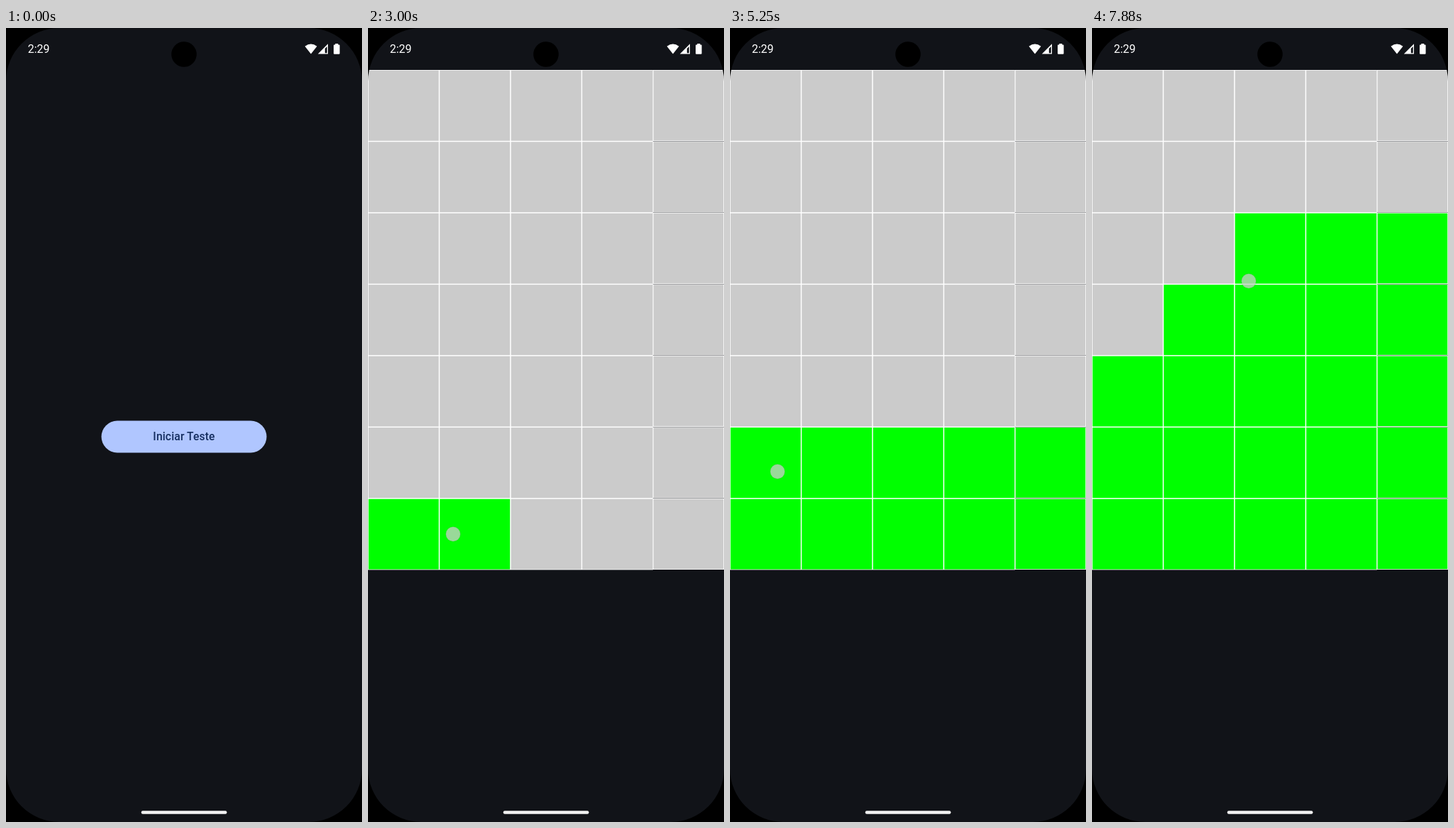
Recreate the animation shown at these times as an HTML page. Size 502 by 1117 pixels, loop 8 s.

```html
<!DOCTYPE html>
<html lang="pt">
<head>
<meta charset="utf-8">
<title>Teste de toque</title>
<style>
  html, body { margin: 0; width: 100%; height: 100%; overflow: hidden; background: #000; }
  svg { display: block; width: 502px; height: 1117px; }
  text { font-family: Roboto, sans-serif; }
</style>
</head>
<body>
<svg viewBox="0 0 502 1117">
  <defs>
    <radialGradient id="soft">
      <stop offset=".8" stop-color="#152e60"/>
      <stop offset="1" stop-color="#152e60" stop-opacity="0"/>
    </radialGradient>
    <clipPath id="pill"><rect x="134.5" y="552.6" width="233" height="44.8" rx="22.4"/></clipPath>
  </defs>
  <rect width="502" height="1117" fill="#111318"/>

  <g id="start">
    <rect x="134.5" y="552.6" width="233" height="44.8" rx="22.4" fill="#b0c6ff"/>
    <circle id="ripple" cx="250.5" cy="575" fill="url(#soft)" clip-path="url(#pill)"/>
    <text x="251" y="580.4" font-size="15.7" font-weight="500" letter-spacing=".11" text-anchor="middle" fill="#152e60">Iniciar Teste</text>
  </g>

  <g id="grid"></g>

  <path fill="#000" fill-rule="evenodd" d="M0 0H502V1117H0ZM75 0A75 75 0 0 0 0 75V1042A75 75 0 0 0 75 1117H427A75 75 0 0 0 502 1042V75A75 75 0 0 0 427 0Z"/>
  <circle cx="251" cy="37" r="17.8" fill="#000"/>
  <g fill="#fff">
    <text x="30.7" y="35.4" font-size="16">2:29</text>
    <path d="M421.5 25.8Q430 19 438.5 25.8L430 36.6Z"/>
    <path fill-rule="evenodd" d="M439.8 36.6L454 22.3V36.6ZM449.8 29V35.2H452.7V25.9Z"/>
    <path d="M464.3 22H468.3V23.5H469.6Q470.6 23.5 470.6 24.5V35.7Q470.6 36.7 469.6 36.7H463Q462 36.7 462 35.7V24.5Q462 23.5 463 23.5H464.3Z"/>
    <rect x="190.7" y="1101.3" width="120.8" height="4.5" rx="2.25" fill="#f2f2f2"/>
  </g>

  <circle id="touch" r="10.2" fill="#ccc" fill-opacity=".75" stroke="#888" stroke-opacity=".3" stroke-width=".7"/>
</svg>
<script>
const LOOP = 8000, STEP = 125;
const FADE_START = 968, FADE_TIME = 700;

// The grid is laid out in device pixels: 1344 across, so the last column gets one less.
const SCALE = 502 / 1344, TOP = 59;
const COLS = 5, ROWS = 7, CELL = 269, BORDER = 2;

// Key points [time, x, y] of each finger stroke; the finger moves evenly between them.
const press = [[125, 262, 577], [375, 262, 577]];
const tap = [[2375, 42, 712], [2625, 62, 712]];
const drag = [
  [3000, 120, 712], [3875, 331, 710], [4500, 460, 625], [4750, 445, 668],
  [5250, 67, 624], [5500, 58, 669], [5750, 64, 520], [6000, 155, 420],
  [6375, 385, 581], [6750, 275, 395], [7000, 258, 522], [7375, 440, 515],
  [7625, 440, 330], [7875, 221, 356]
];

const byId = id => document.getElementById(id);
const start = byId('start'), grid = byId('grid'), ripple = byId('ripple'), touch = byId('touch');
const clamp = v => Math.min(1, Math.max(0, v));

function setAttrs(el, attrs) {
  for (const name in attrs) el.setAttribute(name, attrs[name]);
}

function addRect(x, y, width, height, fill) {
  const el = document.createElementNS('http://www.w3.org/2000/svg', 'rect');
  setAttrs(el, { x, y, width, height, fill });
  return grid.appendChild(el);
}

function fingerAt(t) {
  const stroke = [press, tap, drag].find(s => t >= s[0][0] && t <= s.at(-1)[0]);
  if (!stroke) return null;
  const next = Math.max(1, stroke.findIndex(point => point[0] >= t));
  const [t0, x0, y0] = stroke[next - 1], [t1, x1, y1] = stroke[next];
  const k = (t - t0) / (t1 - t0);
  return { x: x0 + (x1 - x0) * k, y: y0 + (y1 - y0) * k };
}

// Cubic bezier easing (.4, 0, .2, 1), solved by bisection.
function ease(x) {
  let lo = 0, hi = 1;
  for (let i = 0; i < 24; i++) {
    const s = (lo + hi) / 2, r = 1 - s;
    if (1.2 * s * r * r + 0.6 * s * s * r + s ** 3 < x) lo = s; else hi = s;
  }
  return lo * lo * (3 - 2 * lo);
}

// Cells are square, so the narrower last column leaves gaps between its rows.
const cells = [];
setAttrs(grid, { transform: `translate(0 ${TOP}) scale(${SCALE})` });
addRect(0, 0, CELL * (COLS - 1), CELL * ROWS, '#fff');
for (let row = 0; row < ROWS; row++)
  for (let col = 0; col < COLS; col++) {
    const x = col * CELL, y = row * CELL;
    const size = col === COLS - 1 ? CELL - 1 : CELL;
    if (size < CELL) addRect(x, y, size, size, '#fff');
    const inner = size - 2 * BORDER;
    cells.push({ el: addRect(x + BORDER, y + BORDER, inner, inner, '#cbcbcb'), litAt: Infinity });
  }

for (let t = tap[0][0]; t < LOOP; t += STEP) {
  const finger = fingerAt(t);
  if (!finger) continue;
  const row = Math.floor((finger.y - TOP) / SCALE / CELL);
  const col = Math.floor(finger.x / SCALE / CELL);
  const cell = cells[row * COLS + col];
  cell.litAt = Math.min(cell.litAt, t);
}

function draw(now) {
  const t = Math.floor((now % LOOP) / STEP) * STEP;

  const shown = ease(clamp((t - FADE_START) / FADE_TIME));
  setAttrs(start, { opacity: 1 - shown });
  setAttrs(grid, { opacity: shown });

  setAttrs(ripple, {
    r: 30 + 73 * clamp((t - 50) / 400),
    opacity: t < STEP ? 0 : 0.12 * (1 - clamp((t - 450) / 425))
  });

  for (const { el, litAt } of cells) setAttrs(el, { fill: t >= litAt ? '#0f0' : '#cbcbcb' });

  const finger = fingerAt(t);
  setAttrs(touch, { visibility: finger ? 'visible' : 'hidden' });
  if (finger) setAttrs(touch, { cx: finger.x, cy: finger.y });
}

const began = performance.now();
function tick() {
  draw(performance.now() - began);
  requestAnimationFrame(tick);
}
tick();
</script>
</body>
</html>
```
